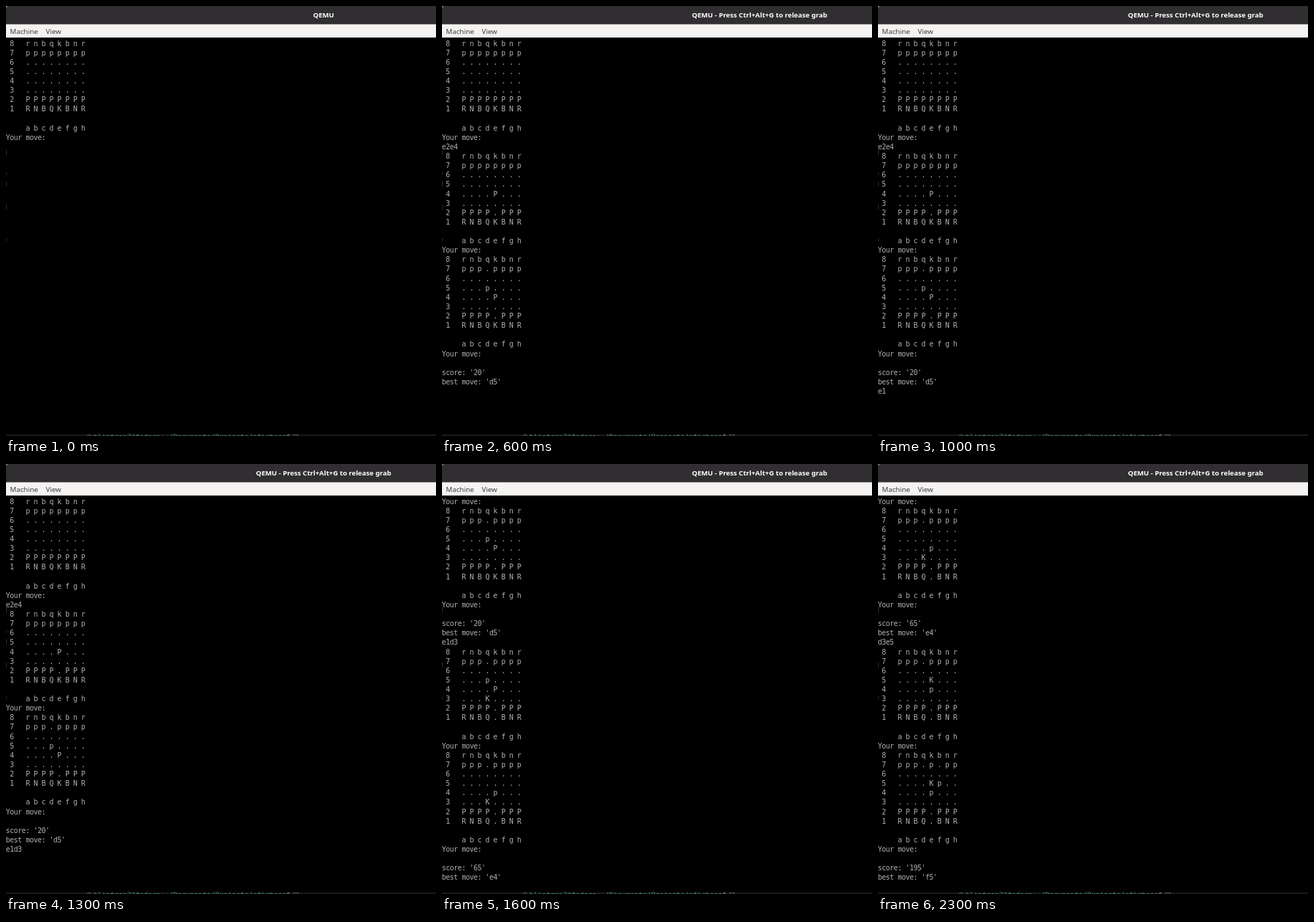
An HTML page with a canvas that plays this animation: 600x600 px, repeating every 2.4 s.

```html
<!DOCTYPE html>
<html lang="en">
<head>
<meta charset="utf-8">
<title>Chess in a virtual machine</title>
<style>
html, body { margin: 0; width: 100%; height: 100%; overflow: hidden; background: #000; }
canvas { display: block; width: 600px; height: 600px; }
</style>
</head>
<body>
<canvas id="stage" width="600" height="600"></canvas>
<script>
const ctx = document.getElementById('stage').getContext('2d');
const LOOP = 2400;
const CELL_W = 5.525, CELL_H = 13.12, BASELINE = 55.6;
const ROWS = 42, SCREEN_TOP = 44, SCREEN_BOTTOM = 597.5;

// Terminal log, built by playing the game
const board = ['rnbqkbnr', 'pppppppp', '........', '........',
  '........', '........', 'PPPPPPPP', 'RNBQKBNR'].map(rank => [...rank]);
const log = [];

function play(move) {
  const [fromFile, fromRank, toFile, toRank] =
    [...move].map((c, i) => i % 2 ? 8 - c : c.charCodeAt(0) - 97);
  board[toRank][toFile] = board[fromRank][fromFile];
  board[fromRank][fromFile] = '.';
}

function printBoard() {
  board.forEach((rank, i) => log.push(` ${8 - i}   ${rank.join(' ')}`));
  log.push('', '     a b c d e f g h', 'Your move:');
}

function playRound(move, reply, score) {
  log.push(move);
  play(move);
  printBoard();
  play(reply);
  printBoard();
  log.push('', `score: '${score}'`, `best move: '${reply.slice(2)}'`);
  return log.length;
}

printBoard();
const start = log.length;
const first = playRound('e2e4', 'd7d5', 20);
const second = playRound('e1d3', 'd5e4', 65);
const third = playRound('d3e5', 'f7f5', 195);

// Each state: time, finished lines, typed characters of the next line
const states = [
  [0, start, 0], [400, start, 2], [500, start, 4],
  [600, first, 0], [700, first, 2], [1200, first, 3], [1300, first, 4],
  [1500, first + 8, 0, 345],
  [1600, second, 0], [1800, second, 1], [1900, second, 2],
  [2000, second, 3], [2100, second, 4], [2300, third, 0],
];

function rect(color, x, y, w, h) {
  ctx.fillStyle = color;
  ctx.fillRect(x, y, w, h);
}

function label(text, x, y, font, color, align = 'left') {
  ctx.font = font;
  ctx.fillStyle = color;
  ctx.textAlign = align;
  ctx.fillText(text, x, y);
}

function drawLines(lines, offset, top, bottom) {
  ctx.save();
  ctx.beginPath();
  ctx.rect(0, top, 600, bottom - top);
  ctx.clip();
  ctx.font = '10px "DejaVu Sans Mono", monospace';
  ctx.fillStyle = '#b0b0b0';
  ctx.textAlign = 'center';
  lines.slice(offset, offset + ROWS).forEach((line, row) => {
    [...line].forEach((char, col) => {
      if (char !== ' ') ctx.fillText(char, (col + 0.5) * CELL_W, BASELINE + row * CELL_H);
    });
  });
  ctx.restore();
}

function drawTerminal(t) {
  const [, done, typed, tear] = states.findLast(state => state[0] <= t);
  const lines = log.slice(0, done);
  if (typed) lines.push(log[done].slice(0, typed));
  if (tear) {
    // The screen is caught halfway through scrolling one line
    drawLines(log, 4, SCREEN_TOP, tear);
    drawLines(lines, 3, tear, SCREEN_BOTTOM);
  } else {
    drawLines(lines, Math.max(0, done + 1 - ROWS), SCREEN_TOP, SCREEN_BOTTOM);
  }
}

function drawWindow(t) {
  rect('#000', 0, 0, 600, 600);
  rect('#777', 0, 0, 3, 3);
  ctx.fillStyle = '#302e30';
  ctx.beginPath();
  ctx.roundRect(0, 0, 604, 26, [5, 0, 0, 0]);
  ctx.fill();
  rect('#f4f3f1', 0, 25.5, 600, 18.5);
  const title = t < 100 ? 'QEMU' : 'QEMU - Press Ctrl+Alt+G to release grab';
  label(title, 443.2, 16, 'bold 9.6px "Noto Sans", sans-serif', '#fff', 'center');
  const menuFont = '9.8px "Noto Sans", sans-serif';
  label('Machine', 5.5, 38.5, menuFont, '#3c3c3c');
  label('View', 55.5, 38.5, menuFont, '#3c3c3c');
  for (const [y, h] of [[200, 8], [232, 4], [245, 7], [277, 7], [324, 4]]) {
    rect('#2c2c2c', 0, y, 1, h);
  }
}

function drawShell() {
  ctx.save();
  ctx.beginPath();
  ctx.rect(0, SCREEN_BOTTOM, 600, 3);
  ctx.clip();
  rect('#17191b', 0, SCREEN_BOTTOM, 600, 3);
  const font = '9.72px "DejaVu Sans Mono", monospace';
  label('blintrop7@fedora', 122, 604.5, font, '#4b9a80');
  label(':', 215.6, 604.5, font, '#999');
  label('~/Documents/Projects/efichess', 221.5, 604.5, font, '#4b9a80');
  label('$', 391, 604.5, font, '#999');
  ctx.strokeStyle = '#777';
  ctx.lineWidth = 0.8;
  ctx.beginPath();
  ctx.arc(116, 600.5, 2.5, 0, Math.PI * 2);
  ctx.stroke();
  ctx.strokeRect(401.5, 598, 6, 9);
  ctx.restore();
}

function frame() {
  const t = performance.now() % LOOP;
  drawWindow(t);
  drawTerminal(t);
  drawShell();
  requestAnimationFrame(frame);
}
frame();
</script>
</body>
</html>
```
